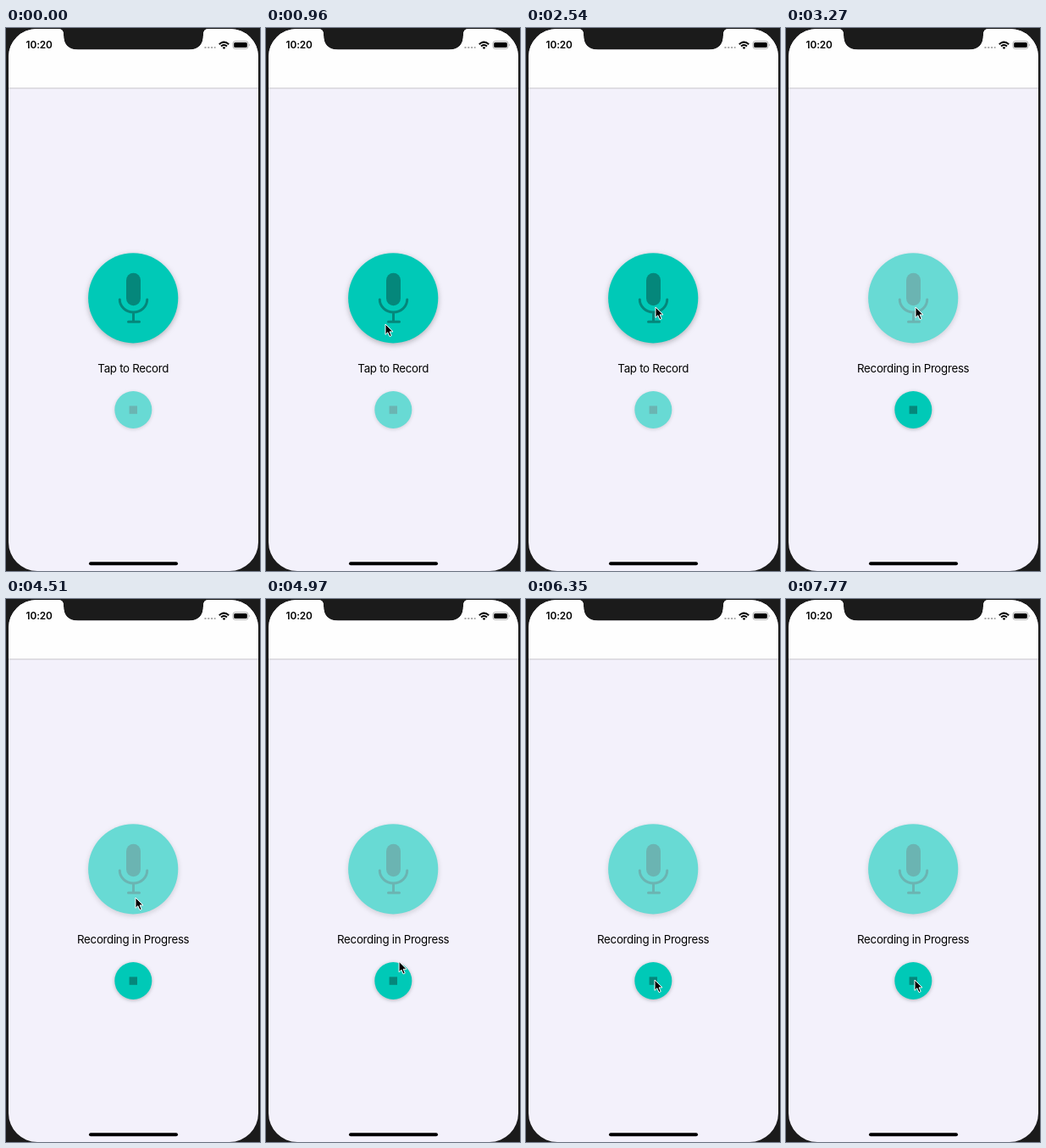
Animation, 300 px wide and 640 px high, one loop 8 s. Source, as an HTML page:

```html
<!DOCTYPE html>
<html lang="en">
<head>
<meta charset="utf-8">
<title>Recorder</title>
<style>
  html, body { margin: 0; width: 100%; height: 100%; overflow: hidden; background: #1b1b1b; }
  svg { display: block; }
  text { font-family: Inter, sans-serif; }
  #label { font-size: 13.3px; letter-spacing: -.29px; text-anchor: middle; }
  .clock { font-size: 11.8px; font-weight: 600; letter-spacing: -.1px; }
  .button { fill: #00c9b7; }
  .icon { fill: #05877b; }
  .line { fill: none; stroke: #05877b; stroke-width: 3; stroke-linecap: round; }
  #record { filter: drop-shadow(0 2px 3px #0004); }
  #stop { filter: drop-shadow(0 1px 2px #0004); }
</style>
</head>
<body>
<svg width="300" height="640" viewBox="0 0 300 640">
  <defs>
    <clipPath id="screen">
      <path d="M3 34A33 33 0 0 1 36 1H62Q68 1 68 8Q68 25.5 85 25.5H216Q233 25.5 233 8Q233 1 239 1H265A33 33 0 0 1 298 34V606A34 34 0 0 1 264 640H37A34 34 0 0 1 3 606Z"/>
    </clipPath>
  </defs>
  <rect width="300" height="640" fill="#1b1b1b"/>
  <g clip-path="url(#screen)">
    <rect width="300" height="640" fill="#f3f1fb"/>
    <rect width="300" height="70.5" fill="#fefefe"/>
    <rect y="70.5" width="300" height="1" fill="#c9c8cc"/>
  </g>

  <text class="clock" x="23.6" y="24">10:20</text>
  <path d="M234.5 23H247.5" stroke="#aaa" stroke-width="2" stroke-dasharray="2 1.8"/>
  <g fill="none" stroke="#000" stroke-width="2">
    <path d="M251.8 19.2Q257.5 14 263.2 19.2M254 21.6Q257.5 18.4 261 21.6"/>
    <path d="M257.5 25L255.6 23Q257.5 21.4 259.4 23Z" fill="#000" stroke="none"/>
  </g>
  <rect x="268" y="15.7" width="18" height="8.6" rx="2.5" fill="none" stroke="#999" stroke-width=".8"/>
  <rect x="269.2" y="16.9" width="15.6" height="6.2" rx="1.5"/>
  <path d="M287 18.5Q288.6 20 287 21.5Z" fill="#999"/>

  <g id="record">
    <circle class="button" cx="150.2" cy="318.3" r="53.1"/>
    <rect class="icon" x="142" y="288.8" width="17" height="38.5" rx="8.5"/>
    <path class="line" d="M134.3 320A16.2 15 0 0 0 166.7 320M150.5 335V346M144.5 346.3H157.5"/>
  </g>
  <text id="label" x="150.2" y="405.5"></text>
  <g id="stop">
    <circle class="button" cx="150.3" cy="450" r="22"/>
    <rect class="icon" x="145.6" y="445.4" width="9.4" height="9.4"/>
  </g>
  <rect x="98" y="629.3" width="105" height="4" rx="2"/>
  <path id="cursor" d="M0 0V12.4L2.8 9.7L5 14.6L7.2 13.6L5.1 8.9H9Z" stroke="#fff"/>
</svg>
<script>
const LOOP = 8000, PRESS = 2880, FADE = 200, DISABLED = 0.57;
const [record, stop, label, cursor] =
  ["record", "stop", "label", "cursor"].map(id => document.getElementById(id));

// Pointer stops: time, x, y
const path = [
  [460, 6, 430], [820, 133, 356], [960, 141, 349], [1560, 145, 346], [1660, 145, 346],
  [2400, 153, 329], [4130, 153, 329], [4510, 153, 352], [4930, 157, 427],
  [5400, 160, 443], [5770, 160, 443], [6370, 152, 449], [LOOP, 152, 449]
];

const clamp = v => Math.min(1, Math.max(0, v));
const smooth = v => v * v * (3 - 2 * v);

function pointerAt(t) {
  const i = path.findIndex(p => p[0] > t);
  const [t0, x0, y0] = path[i - 1], [t1, x1, y1] = path[i];
  const k = smooth((t - t0) / (t1 - t0));
  return [x0 + (x1 - x0) * k, y0 + (y1 - y0) * k];
}

function draw(now) {
  const t = now % LOOP;
  const k = smooth(clamp((t - PRESS) / FADE));
  record.style.opacity = 1 + (DISABLED - 1) * k;
  stop.style.opacity = DISABLED + (1 - DISABLED) * k;
  label.textContent = k < 0.5 ? "Tap to Record" : "Recording in Progress";
  const visible = t >= path[0][0];
  cursor.style.display = visible ? "" : "none";
  if (visible) cursor.setAttribute("transform", `translate(${pointerAt(t)})`);
}

const start = performance.now();
function tick() {
  draw(performance.now() - start);
  requestAnimationFrame(tick);
}
tick();
</script>
</body>
</html>
```
